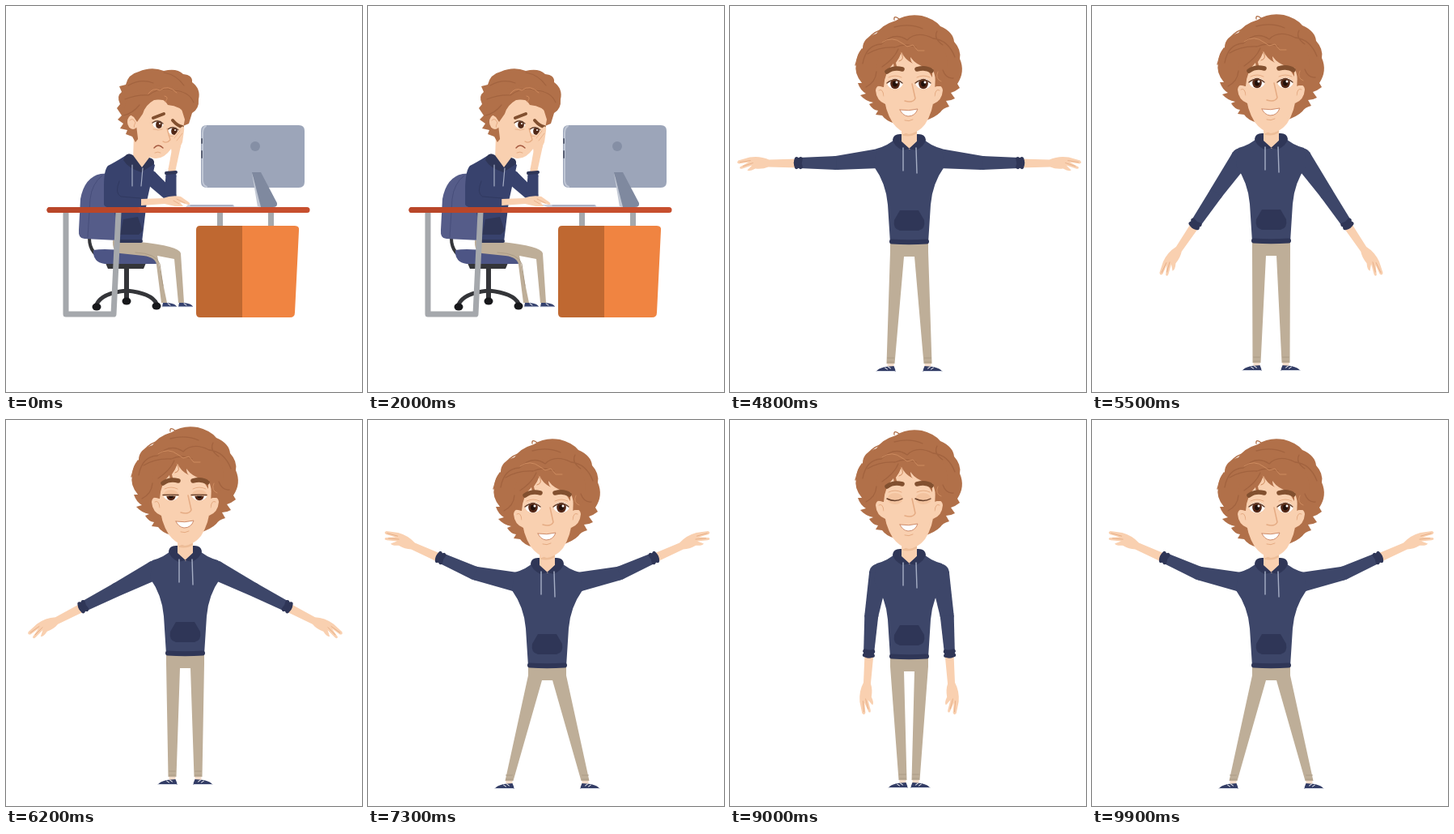
An HTML page with a canvas for the animation above (10 s loop, 440 by 476 pixels).

```html
<!DOCTYPE html>
<html lang="en">
<head>
<meta charset="utf-8">
<title>Desk break</title>
<style>
html, body { margin: 0; width: 100%; height: 100%; overflow: hidden; background: #fff; }
canvas { display: block; }
</style>
</head>
<body>
<canvas id="stage" width="440" height="476"></canvas>
<script>
const ctx = document.getElementById('stage').getContext('2d');
const LOOP = 10000, CUT = 4000, STEP = 100;
const SKIN = '#f9d0b0', SKIN_DARK = '#e5ab83', HAIR = '#b17049', HAIR_DARK = '#a2633f',
      BROW = '#82502f', NAVY = '#3d4669', NAVY_DARK = '#2f3657', PANTS = '#beae98',
      PANTS_DARK = '#ac9c86', STEEL = '#a5a8ac', BLACK = '#343539', CORD = '#a6aec5';
ctx.lineCap = ctx.lineJoin = 'round';

function fill(d, color) {
  ctx.fillStyle = color;
  ctx.fill(new Path2D(d));
}
function line(d, color, width = 1) {
  ctx.strokeStyle = color;
  ctx.lineWidth = width;
  ctx.stroke(new Path2D(d));
}
function oval(x, y, rx, ry, color) {
  ctx.fillStyle = color;
  ctx.beginPath();
  ctx.ellipse(x, y, rx, ry, 0, 0, 7);
  ctx.fill();
}
function group(x, y, angle, draw) {
  ctx.save();
  ctx.translate(x, y);
  ctx.rotate(angle);
  draw();
  ctx.restore();
}
// Tapered tube through [x, y, radius] points
function limb(points, color) {
  points.forEach(([x, y, r], i) => {
    oval(x, y, r, r, color);
    if (!i) return;
    const [px, py, pr] = points[i - 1];
    const len = Math.hypot(x - px, y - py), nx = (py - y) / len, ny = (x - px) / len;
    fill(`M${px + nx * pr},${py + ny * pr} L${x + nx * r},${y + ny * r}
      L${x - nx * r},${y - ny * r} L${px - nx * pr},${py - ny * pr}Z`, color);
  });
}
const AXIS = 221.5;
function both(draw) {
  draw();
  ctx.save();
  ctx.translate(2 * AXIS, 0);
  ctx.scale(-1, 1);
  draw();
  ctx.restore();
}

// ---- Desk scene ----
function chair() {
  line('M103,286 Q103,308 126,314', BLACK, 4);
  fill('M123,317 H173 L170,324 H126Z', BLACK);
  line('M149,322 V362', BLACK, 6);
  line('M112,368 Q118,354 149,351 Q180,354 186,367', BLACK, 5);
  for (const [x, y] of [[112, 371], [149, 364], [186, 370]]) oval(x, y, 5.5, 4.5, '#17181b');
  fill('M97,287 Q89,287 90,276 L92,238 Q97,211 117,207 Q130,205 138,210 V289Z', '#555c89');
  line('M101,285 L104,238 Q106,219 119,209', '#474e7b', 1);
  fill('M108,301 Q130,297 187,308 V318 H122 Q107,316 108,301Z', '#4d5585');
}
function sittingBody(sway) {
  fill('M132,289 L165,291 Q214,296 216,305 L220,366 H213 L208,312 L187,308 L199,366 H192 L186,319 Q185,310 170,308 L141,305 Q131,303 132,289Z', PANTS);
  line('M160,304 Q186,305 190,318 L194,345', PANTS_DARK);
  for (const x of [194, 214]) {
    fill(`M${x},366 L${x + 6},366 Q${x + 16},367 ${x + 17},371 H${x - 1}Z`, '#34416f');
    line(`M${x - 1},371 H${x + 16}`, '#dfe3ee');
    line(`M${x + 6},367 L${x + 9},369`, '#fff');
  }
  limb([[178, 211, 9], [203, 234, 7.5], [204, 209, 6.5]], '#38426d');
  limb([[205, 202, 4.5], [211, 172, 5]], SKIN);
  line('M198,206 L210,205', NAVY_DARK, 4);
  const left = 121 - 2 * sway;
  fill(`M147,185 Q134,193 126,197 Q121,202 ${left},222 V245 Q122,249 133,249 L141,291 H168 L174,241 L184,196 L170,185Z`, '#38426d');
  fill('M145,263 L163,260 L169,277 L164,282 H141Z', NAVY_DARK);
  line('M141,290 H167', NAVY_DARK, 4);
  fill('M158,158 L181,180 L176,190 L168,200 L157,190Z', SKIN);
  fill('M147,185 Q151,180 157,184 L168,199 L177,187 Q184,188 183,195 L167,205 Q151,200 145,190Z', NAVY_DARK);
  line('M156,196 V222 M169,200 L167,222', CORD, 1.2);
  line(`M140,216 Q134,231 ${142 - sway},235 L166,237`, '#303960');
}
function sadHead() {
  fill('M160,168 L156,161 L148,158 L150,153 L141,151 L145,145 L138,140 L143,135 L137,126 L141,121 Q136,111 143,106 L140,99 L148,97 Q151,84 164,81 Q180,74 195,80 Q211,76 219,84 Q231,85 230,94 Q241,102 238,115 Q239,127 230,132 L226,145 L214,150 L182,140Z', HAIR);
  fill('M160,139 L174,118 Q194,111 216,124 L221,140 Q219,158 205,175 Q195,189 184,188 Q173,187 164,171Z', SKIN);
  oval(157, 143, 7, 9, SKIN);
  line('M153,141 Q157,137 160,144 Q157,149 159,150', SKIN_DARK);
  fill('M147,130 Q145,104 176,101 Q205,91 226,111 Q237,119 223,135 Q216,123 200,122 Q194,112 183,116 Q172,122 169,133 L162,143 L158,137Z', HAIR);
  line('M147,115 Q162,109 176,110 Q193,98 207,104 Q226,105 232,119 M151,98 Q167,89 182,95 M145,135 Q156,133 165,122 M195,82 Q211,85 220,98', HAIR_DARK, 1.2);
  line('M176,108 Q182,100 190,104 Q200,96 211,107 M197,118 Q202,112 196,111', '#cf8a5e', 1);
  for (const [x, y] of [[188, 146], [207, 154]]) {
    oval(x, y, 6.5, 4.7, '#fff');
    oval(x + 1, y + .5, 3.8, 4.4, '#502817');
    oval(x + 2, y - 1, 1, 1, '#fff');
    line(`M${x - 7},${y - 2} Q${x},${y - 7} ${x + 6},${y - 1}`, '#66402b', 1.3);
    line(`M${x - 6},${y + 6} Q${x},${y + 8} ${x + 5},${y + 6}`, SKIN_DARK, .8);
  }
  line('M182,138 L195,133 M206,141 Q212,148 218,149', BROW, 4);
  line('M199,151 L203,165 Q199,170 194,167', SKIN_DARK, 1.3);
  line('M183,175 Q188,169 194,175', '#a5593f', 1.4);
  line('M184,181 Q188,179 191,181', SKIN_DARK);
  fill('M205,181 Q202,169 205,163 L217,149 Q221,147 220,154 L218,168 L212,181Z', SKIN);
  line('M208,163 L215,154 M211,166 L218,157', SKIN_DARK, .8);
}
function desk() {
  fill('M248,147 H362 Q369,147 369,154 V217 Q369,224 362,224 H248 Q241,224 241,217 V154 Q241,147 248,147Z', '#9ca5b9');
  line('M247,148 Q243,150 243,157 V215 Q243,221 248,223', '#c0c7d5', 2);
  line('M242,164 V169 M242,179 V187', '#596075', 2);
  oval(308, 173, 6, 6, '#858fa5');
  fill('M304,206 L318,241 L317,248 H311Z', '#c3c9d5');
  fill('M304,205 H315 L335,243 Q336,248 330,248 H315Z', '#7f899f');
  for (const x of [261, 324]) fill(`M${x},255 h7 v17 h-7Z`, STEEL);
  fill('M240,271 H292 V384 H240 Q235,384 235,379 V276 Q235,271 240,271Z', '#bf6831');
  fill('M292,271 H357 Q363,271 362,277 L357,378 Q357,384 351,384 H292Z', '#f08441');
  line('M74,255 V380 H133 L139,255', STEEL, 7);
  line('M54,251.5 H372', '#c74f2e', 7);
  line('M54,251.5 H162', '#b94629', 7);
}
function deskScene(t) {
  const sway = Math.sin(Math.PI * t / 2600) ** 2;
  chair();
  sittingBody(sway);
  sadHead();
  desk();
  fill(`M${225 - 26 * sway},245 H281 L283,248 H222Z`, '#c8cddb');
  line('M228,246 H280', '#8d96ac');
  line('M283,247.5 H312', '#dce0e8');
  group(-4 * sway, 0, 0, () => {
    fill('M167,238 L194,237 Q205,233 216,235 L226,242 Q229,245 225,245 L215,242 L219,247 H209 L196,244 L167,246Z', SKIN);
    line('M211,238 L221,243 M207,240 L214,244', SKIN_DARK, .8);
  });
}

// ---- Jumping scene: one value for each step of the cycle ----
const UPPER = [-12, 6, 27, 56, 80, 85, 82, 72, 55, 32, 8, -8, -15];
const FORE = [-24, 0, 27, 60, 86, 91, 88, 76, 56, 28, 0, -18, -28];
const LIFT = [11, -1, -4, -3, 0, 6, 10, 4, -2, -2, 0, 6, 11];
const SPREAD = [65, 41, 34, 29, 26, 26, 26, 27, 36, 50, 62, 66, 66];
const FLOOR = [455, 451, 450, 451, 454, 455, 455, 454, 450, 451, 455, 455, 455];
const EYES = [1, 1, .45, .1, 0, 0, .45, 1, 1, 1, 1, 1, 1];

function leg(spread, floor, lift) {
  const x = AXIS - spread + 18, y = floor - 10;
  fill(`M198,${288 + lift} H222 V${310 + lift} H215 L${x + 5},${y} H${x - 5} L198,${304 + lift}Z`, PANTS);
  line(`M${x - 4},${y - 7} H${x + 4} M${x - 4},${y - 2} H${x + 4}`, PANTS_DARK);
  fill(`M${x - 4},${y} h8 v4 h-8Z`, '#f3ddcb');
  fill(`M${x + 6},${floor} H${x - 18} Q${x - 16},${floor - 4} ${x - 7},${floor - 6} L${x + 4},${floor - 7} Q${x + 6},${floor - 3} ${x + 6},${floor}Z`, '#333d66');
  line(`M${x - 17},${floor - .5} H${x + 5}`, '#dfe3ec');
  line(`M${x - 7},${floor - 5} l3,2 m1,-3 l3,2`, '#fff');
}
function arm(upper, fore) {
  const a = upper * Math.PI / 180, b = fore * Math.PI / 180;
  const ex = 184 - 53 * Math.cos(a), ey = 189 + 53 * Math.sin(a);
  const wx = ex - 46 * Math.cos(b), wy = ey + 46 * Math.sin(b);
  group(wx, wy, -b, () => {
    fill('M0,-5 L-37,-4 Q-48,-9 -61,-7 L-75,-3 Q-78,0 -74,1 L-62,-1 L-73,5 Q-74,8 -70,7 L-58,3 L-64,9 Q-61,11 -54,7 Q-45,8 -38,5 L0,6Z', SKIN);
    line('M-73,-1 L-60,-3 M-69,4 L-57,0', SKIN_DARK, .8);
  });
  limb([[184, 189, 12], [ex, ey, 8.5], [wx, wy, 6.5]], NAVY);
  group(wx, wy, -b, () => line('M-3,-5 Q-5,0 -3,5 M2,-5 Q0,0 2,5', NAVY_DARK, 5));
}
function torso() {
  fill('M205,164 Q196,173 181,177 L178,199 Q193,220 195,246 L198,293 H245 L248,246 Q250,220 265,199 L262,177 Q247,173 238,164Z', NAVY);
  fill('M210,253 H233 L240,265 Q242,276 233,278 H210 Q201,276 203,265Z', NAVY_DARK);
  line('M200,291.5 Q221,293 243,291.5', NAVY_DARK, 6);
  fill('M212,140 H231 V168 L222,178 L212,169Z', SKIN);
  fill('M212,160 L231,152 V158 Q222,164 212,160Z', '#edbd98');
  both(() => fill('M212,159 Q202,158 201,166 Q202,173 213,179 L222,177 L212,168Z', NAVY_DARK));
  line('M214,176 V204 M230,176 L231,207', CORD, 1.4);
}
function eye(open, x) {
  const y = 97;
  oval(x, y, 9.5, 7, '#f3c39f');
  if (open) {
    ctx.save();
    ctx.beginPath();
    ctx.rect(x - 11, y + 7 - 14 * open, 22, 14 * open);
    ctx.clip();
    oval(x, y, 9.5, 6.5, '#fff');
    oval(x, y, 5.8, 6.2, '#542817');
    oval(x, y, 3, 3.4, '#21100b');
    oval(x + 2, y - 2, 1.5, 1.5, '#fff');
    ctx.restore();
  }
  const lid = y + 5 - 14 * open;
  line(`M${x - 10},${y - open} Q${x},${lid} ${x + 9},${y - open}`, '#69412b', 1.4);
  line(`M${x - 8},${y - 8} Q${x},${y - 12} ${x + 8},${y - 8}`, SKIN_DARK);
}
function happyHead(open) {
  fill('M204,146 Q193,143 188,136 L180,135 L183,130 Q176,129 172,122 L177,120 Q167,118 161,111 L168,109 Q161,105 158,96 L163,96 Q153,84 156,72 Q156,60 164,53 Q164,40 181,35 Q188,24 205,19 Q218,10 237,13 Q253,17 260,26 Q276,33 277,45 Q286,55 284,66 Q291,82 281,97 L284,102 Q279,106 273,108 L278,115 Q273,118 267,118 L271,125 Q263,127 260,132 Q253,139 239,143Z', HAIR);
  line('M155,74 Q158,62 163,54 M189,30 Q179,32 172,40 M209,17 Q202,12 203,18', HAIR, 1.3);
  both(() => {
    fill('M194,103 Q181,95 180,105 Q181,118 192,122Z', SKIN);
    line('M184,105 Q189,102 190,112', SKIN_DARK);
  });
  fill('M190,84 L205,52 H240 L254,84 L253,108 Q251,132 241,147 Q233,157 221,159 Q209,156 201,145 Q191,129 190,108Z', SKIN);
  fill('M181,99 Q175,58 206,41 Q238,26 261,50 Q276,68 262,100 L254,100 Q255,88 250,78 L250,89 Q246,83 243,77 Q230,74 223,64 Q223,69 226,72 Q216,67 212,58 Q209,66 205,71 Q206,77 209,80 Q202,78 202,72 Q191,82 190,101Z', HAIR);
  line('M164,72 Q168,49 187,48 Q203,32 219,43 Q231,31 251,41 Q270,43 278,64 M170,60 Q185,51 204,52 Q218,46 230,52 M203,27 Q222,22 238,29 M256,32 Q251,41 263,49 M168,101 Q180,95 181,82 M276,90 Q267,91 263,80 M188,76 Q203,66 208,54', HAIR_DARK, 1.3);
  line('M188,46 Q200,37 213,47 L219,51 L226,49 L232,56 L240,56 M211,58 Q217,67 209,69 M257,82 Q253,91 261,94', '#cd8b5f', 1);
  eye(open, 204);
  eye(open, 239);
  line('M194,82 Q202,76 213,79 M231,79 Q242,76 249,81', BROW, 5.5);
  line('M225,97 L229,115 Q226,121 216,118', SKIN_DARK, 1.5);
  fill('M210,129 Q221,131 232,128 Q229,137 220,137 Q213,136 210,129Z', '#fff');
  line('M210,129 Q221,131 232,128 Q229,137 220,137 Q213,136 210,129', '#cf8d6c', 1);
  line('M216,142 Q221,144 226,141', SKIN_DARK);
}
function jumpScene(t) {
  const i = Math.round((t - CUT) / STEP + 6) % 13;
  both(() => leg(SPREAD[i], FLOOR[i], LIFT[i]));
  group(0, LIFT[i], 0, () => {
    both(() => arm(UPPER[i], FORE[i]));
    torso();
    happyHead(EYES[i]);
  });
}

function frame(now) {
  const t = Math.floor(now % LOOP / STEP) * STEP;
  ctx.fillStyle = '#fff';
  ctx.fillRect(0, 0, 440, 476);
  if (t < CUT) deskScene(t);
  else jumpScene(t);
}
const start = performance.now();
function tick(now) {
  frame(Math.max(0, now - start));
  requestAnimationFrame(tick);
}
requestAnimationFrame(tick);
</script>
</body>
</html>
```
